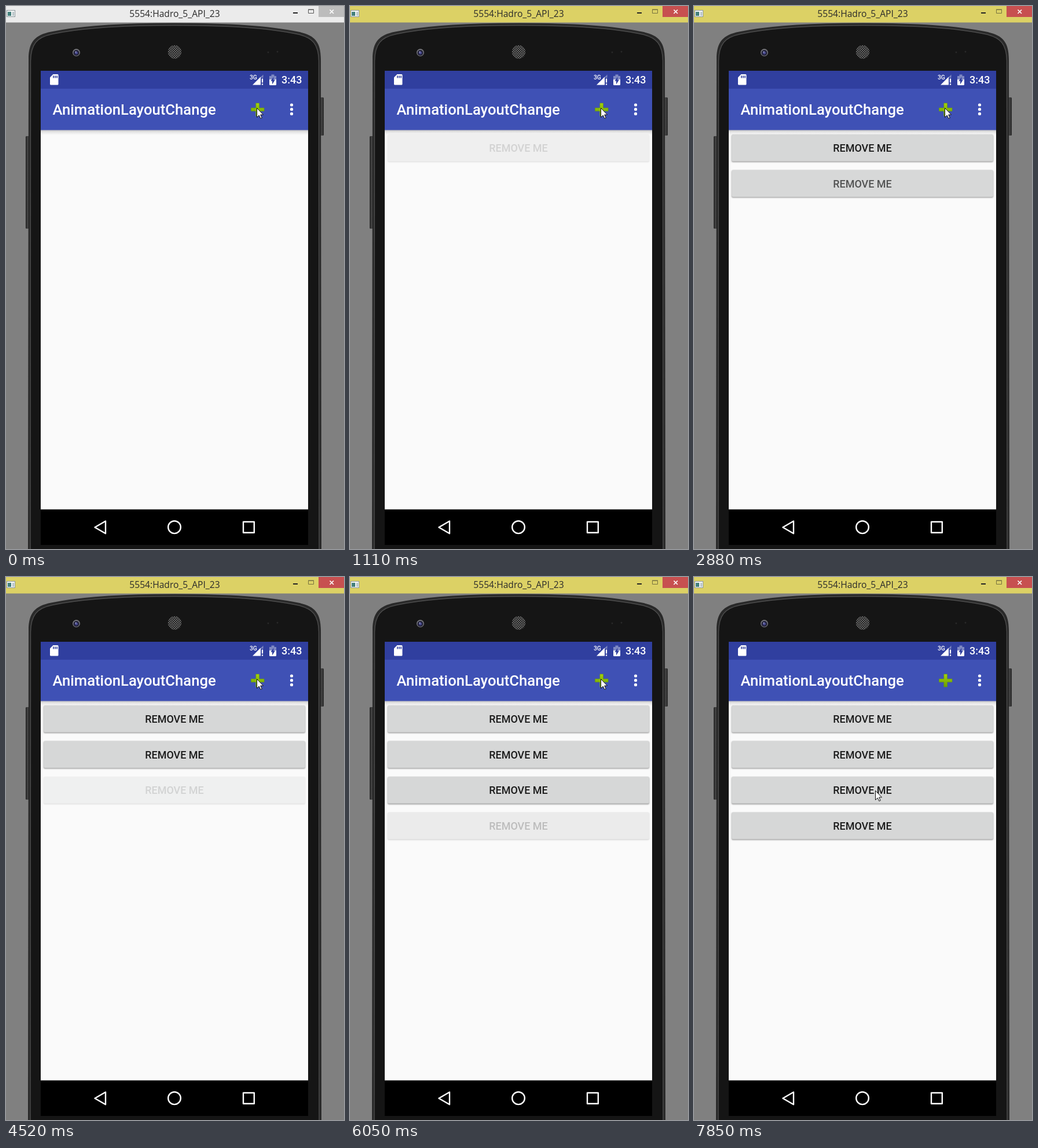
Animation, 584 px wide and 939 px high, one loop 8000 ms. Source, as an HTML page:

```html
<!DOCTYPE html>
<html lang="en">
<head>
<meta charset="utf-8">
<title>Layout change</title>
<style>
  html, body { margin: 0; width: 100%; height: 100%; overflow: hidden; background: #808080; }
  svg { display: block; }
  text { font-family: Roboto, sans-serif; font-weight: 500; fill: #fff; }
  .caption { font: 400 15.6px "Open Sans", "Noto Sans", sans-serif; fill: #2b2b2b; }
  .label { font-size: 17.97px; text-anchor: middle; fill: #1b1b1b; }
  .nav { fill: none; stroke: #fff; stroke-width: 2.4; stroke-linejoin: round; }
</style>
</head>
<body>
<svg id="stage" width="584" height="939" viewBox="0 0 584 939">
  <defs>
    <linearGradient id="drop" x2="0" y2="1">
      <stop offset="0" stop-opacity=".24"/>
      <stop offset=".4" stop-opacity=".09"/>
      <stop offset="1" stop-opacity="0"/>
    </linearGradient>
    <linearGradient id="green" x2="0" y2="1">
      <stop offset="0" stop-color="#a4d20c"/>
      <stop offset="1" stop-color="#6a9e00"/>
    </linearGradient>
    <linearGradient id="side">
      <stop offset="0" stop-color="#1c1c1c"/>
      <stop offset=".45" stop-color="#484848"/>
      <stop offset="1" stop-color="#222"/>
    </linearGradient>
    <pattern id="mesh" width="4" height="4" patternUnits="userSpaceOnUse">
      <rect width="4" height="4" fill="#656565"/>
      <g fill="#191919">
        <circle cx="1" cy="1" r="1.1"/><circle cx="3" cy="3" r="1.1"/>
      </g>
    </pattern>
    <filter id="soft" x="-5%" y="-30%" width="110%" height="160%">
      <feGaussianBlur stdDeviation="1.2"/>
    </filter>
  </defs>

  <!-- window bar -->
  <rect id="bar" width="584" height="28.5"/>
  <rect x="1.5" y="7.5" width="14" height="11" fill="#f4f6f6" stroke="#8b979b"/>
  <rect x="3" y="10" width="6" height="7" fill="#43807c"/>
  <rect x="11" y="10" width="3" height="7" fill="#b7c4c8"/>
  <text class="caption" x="291.5" y="19" text-anchor="middle">5554:Hadro_5_API_23</text>
  <rect x="496" y="11" width="8" height="2" fill="#222"/>
  <path id="max" d="M522.5 6.5h9v6h-9zM522 6h10" fill="none"/>
  <rect id="close" x="540" width="44" height="19"/>
  <path d="M559.5 6.5l6.5 6.5M566 6.5l-6.5 6.5" stroke="#fff" stroke-width="1.7"/>

  <!-- phone body -->
  <rect x="34" y="225" width="7" height="160" rx="1.5" fill="url(#side)"/>
  <rect x="542" y="158" width="7" height="66" rx="1.5" fill="url(#side)"/>
  <path fill="#292929" d="M38 939L39 92C39 62 50 50 78 44.5Q150 29.5 291.500 29.5Q433 29.500 505 44.500C533 50 544 62 544 92L545 939Z"/>
  <path fill="#151515" stroke="#4c4c4c" stroke-width="1.4" d="M42 942L42.500 95C43 66 53 54 80 48.500Q150 33.500 291.500 33.500Q433 33.500 503 48.500C530 54 540 66 540.500 95L541 942Z"/>
  <circle cx="121.500" cy="80.500" r="6.500" fill="#77777b"/>
  <circle cx="121.500" cy="81" r="5" fill="#22223a"/>
  <circle cx="121.500" cy="81" r="2.500" fill="#4a4b91"/>
  <circle cx="120.500" cy="79.500" r="1" fill="#b9bada"/>
  <circle cx="291.500" cy="79.500" r="11.700" fill="url(#mesh)"/>
  <g fill="#292929"><circle cx="453" cy="80" r="1.500"/><circle cx="469" cy="79" r="1.500"/></g>

  <!-- screen -->
  <rect x="60" y="112" width="462" height="820"/>
  <rect x="60" y="214" width="462" height="656.5" fill="#fafafa"/>
  <g id="buttons"></g>
  <rect x="60" y="214" width="462" height="9" fill="url(#drop)"/>
  <rect x="60" y="112" width="462" height="31.200" fill="#303f9f"/>
  <rect x="60" y="143" width="462" height="71.500" fill="#3f51b5"/>

  <!-- status icons -->
  <path fill="#fff" d="M81.500 118H89q1.500 0 1.500 1.500V135q0 1.500-1.500 1.500H77.500q-1.500 0-1.500-1.500V123.500Z"/>
  <path stroke="#303f9f" stroke-width="1.700" d="M82 120.500v4M85 120.500v4M88 120.500v4"/>
  <text x="421" y="126.500" font-size="10.300">3G</text>
  <path fill="#fff" fill-opacity=".35" d="M440 123l4.500-4.500V124H440Z"/>
  <path fill="#fff" d="M426 136.500L440 122.500V136.500Z"/>
  <path stroke="#fff" stroke-width="2.200" d="M443 125.500v7M443 134.200v2.300"/>
  <path fill="#fff" fill-opacity=".38" d="M455 121h3.500v-2.500h5V121h3.500v6h-12Z"/>
  <path fill="#fff" d="M455 127h12v8.500q0 1.500-1.500 1.500h-9q-1.500 0-1.500-1.500Z"/>
  <path fill="#303f9f" d="M462.300 122.500v5h2.700l-5 8v-5.700h-2.700Z"/>
  <text x="476" y="134" font-size="17.970">3:43</text>

  <!-- app bar -->
  <text x="80.500" y="188.300" font-size="25.670">AnimationLayoutChange</text>
  <path fill="url(#green)" stroke="#679b06" stroke-width=".6" d="M431.800 168h5.700v8.200h8.500v5.600h-8.500v8.200h-5.700v-8.200h-8.300v-5.600h8.300Z"/>
  <g fill="#fff">
    <circle cx="493.500" cy="171" r="2.600"/><circle cx="493.500" cy="178.700" r="2.600"/><circle cx="493.500" cy="186.400" r="2.600"/>
  </g>

  <!-- navigation -->
  <path class="nav" d="M153.500 901.500L172 890.700V912.300Z"/>
  <circle class="nav" cx="291" cy="901.300" r="10.800"/>
  <rect class="nav" x="410" y="892" width="18.800" height="18.800"/>

  <path id="cursor" fill="#fff" stroke="#111" stroke-width="1" stroke-linejoin="round"
    d="M.5.500V16.500L4.200 13L6.800 18.500L9.200 17.500L6.700 12H11.500Z"/>
</svg>
<script>
const LOOP = 8000, FOCUS = 560, PITCH = 61.6;
const $ = id => document.getElementById(id);

// Per button: [time, face opacity, label opacity]
const fades = [
  [[1110, .29, .13], [1260, .75, .65], [1390, 1, 1]],
  [[2880, .97, .7], [3020, 1, 1]],
  [[4520, .28, .13], [4670, .97, .75], [4820, 1, 1]],
  [[6050, .4, .22], [6170, .97, .8], [6320, 1, 1]]
];

// Pointer tip: [time, x, y]
const pointer = [
  [0, 433, 176], [7160, 414, 220], [7310, 376, 366], [7460, 347, 430],
  [7580, 322, 442], [7700, 311, 396], [7850, 313, 369]
];

$('buttons').innerHTML = fades.map((_, i) => `
  <g transform="translate(0 ${i * PITCH})">
    <g>
      <rect x="65" y="223" width="452" height="47" rx="2" opacity=".36" filter="url(#soft)"/>
      <rect x="65.2" y="222" width="451.600" height="46.400" rx="2.500" fill="#d6d7d7"/>
    </g>
    <text class="label" x="291" y="252">REMOVE ME</text>
  </g>`).join('');
const buttons = [...$('buttons').children];

const latest = (steps, t) => steps.filter(s => s[0] <= t).pop();

function draw() {
  const t = performance.now() % LOOP, active = t >= FOCUS;
  $('bar').setAttribute('fill', active ? '#dcd165' : '#ebebeb');
  $('close').setAttribute('fill', active ? '#c75050' : '#bcbcbc');
  $('max').setAttribute('stroke', active ? '#77713f' : '#555');

  buttons.forEach((button, i) => {
    const [, face, label] = latest(fades[i], t) || [0, 0, 0];
    button.children[0].setAttribute('opacity', face);
    button.children[1].setAttribute('opacity', label);
  });

  const [, x, y] = latest(pointer, t);
  $('cursor').setAttribute('transform', `translate(${x} ${y})`);
  requestAnimationFrame(draw);
}
draw();
</script>
</body>
</html>
```
